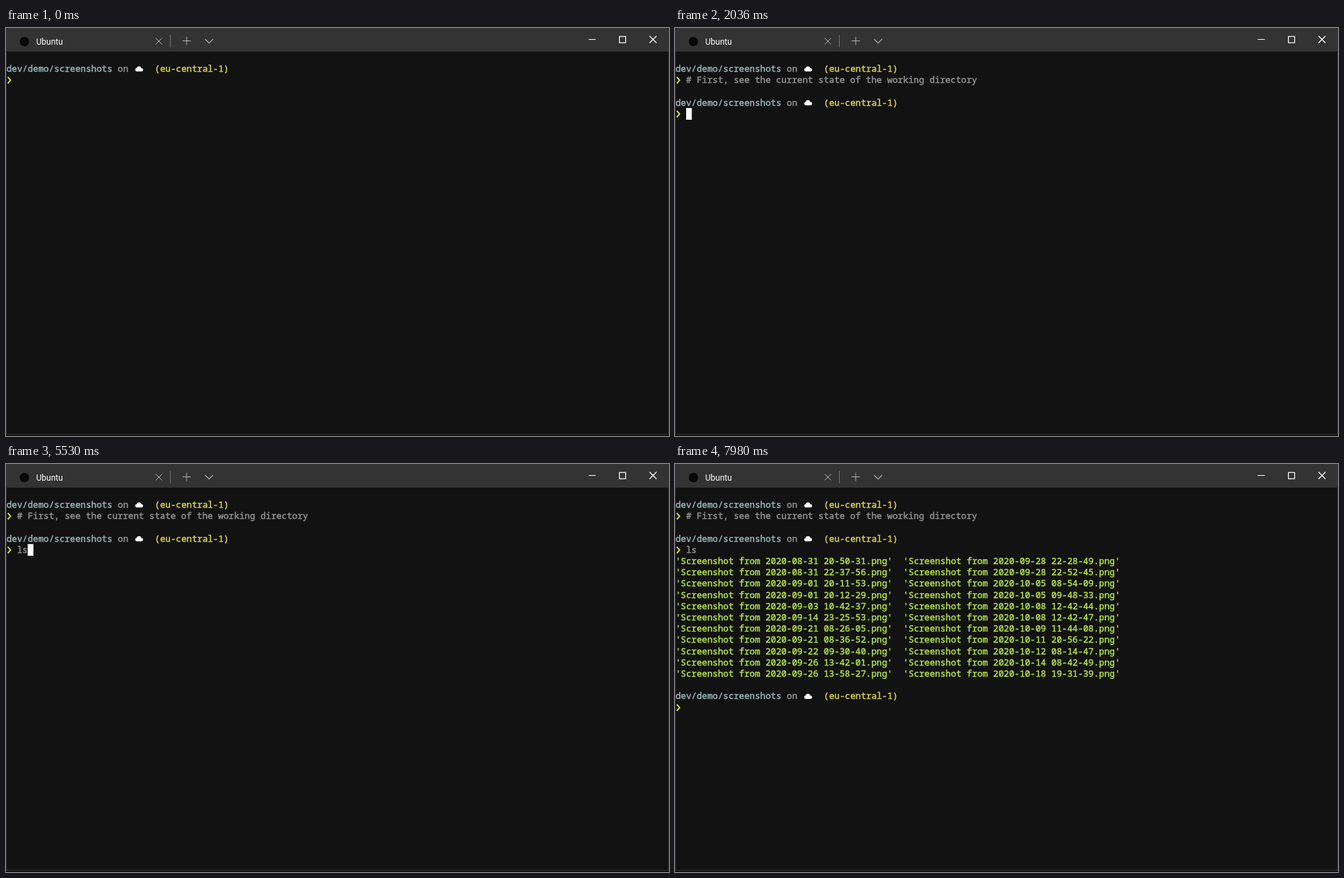
An HTML page with a canvas that plays this animation: 954 px wide and 587 px high, repeating every 8000 ms.

```html
<!DOCTYPE html>
<html lang="en">
<head>
<meta charset="utf-8">
<title>Terminal</title>
<style>
  html, body { margin: 0; width: 100%; height: 100%; overflow: hidden; background: #121212; }
  canvas { display: block; }
</style>
</head>
<body>
<canvas id="stage" width="954" height="587"></canvas>
<script>
const ctx = document.getElementById('stage').getContext('2d');
const LOOP = 8000;
const CELL = { x: 0.76, y: 50.4, w: 7.62, h: 16.2 };
const COLORS = {
  path: '#98b5b7', dim: '#929292', region: '#d9cf4e',
  arrow: '#d8e64a', file: '#b4e347', cursor: '#ffffff'
};

const LEFT_FILES = [
  '08-31 20-50-31', '08-31 22-37-56', '09-01 20-11-53', '09-01 20-12-29',
  '09-03 10-42-37', '09-14 23-25-53', '09-21 08-26-05', '09-21 08-36-52',
  '09-22 09-30-40', '09-26 13-42-01', '09-26 13-58-27'
];
const RIGHT_FILES = [
  '09-28 22-28-49', '09-28 22-52-45', '10-05 08-54-09', '10-05 09-48-33',
  '10-08 12-42-44', '10-08 12-42-47', '10-09 11-44-08', '10-11 20-56-22',
  '10-12 08-14-47', '10-14 08-42-49', '10-18 19-31-39'
];

const colX = col => CELL.x + col * CELL.w;
const rowY = row => CELL.y + row * CELL.h;

function fillRect(color, x, y, w, h) {
  ctx.fillStyle = color;
  ctx.fillRect(x, y, w, h);
}

function stroke(color, width, ...lines) {
  ctx.strokeStyle = color;
  ctx.lineWidth = width;
  ctx.beginPath();
  for (const [x, y, ...rest] of lines) {
    ctx.moveTo(x, y);
    for (let i = 0; i < rest.length; i += 2) ctx.lineTo(rest[i], rest[i + 1]);
  }
  ctx.stroke();
}

// A thin outline gives a weight between regular and bold.
function print(text, col, row, color) {
  const x = colX(col), y = rowY(row) + 12.6;
  ctx.font = '12.7px "Noto Sans Mono", "DejaVu Sans Mono", monospace';
  ctx.fillStyle = ctx.strokeStyle = color;
  ctx.lineWidth = 0.45;
  ctx.lineJoin = 'round';
  ctx.fillText(text, x, y);
  ctx.strokeText(text, x, y);
  ctx.lineJoin = 'miter';
}

function drawCloud(row) {
  const y = rowY(row) + 12.2;
  ctx.fillStyle = '#ffffff';
  ctx.beginPath();
  ctx.arc(188.5, y - 2.5, 2.5, 0, 7);
  ctx.arc(191.3, y - 4.1, 3.3, 0, 7);
  ctx.arc(194.9, y - 2.4, 2.4, 0, 7);
  ctx.rect(188.5, y - 3, 6.4, 3);
  ctx.fill();
}

function drawPrompt(row) {
  print('dev/demo/screenshots', 0, row, COLORS.path);
  print('on', 21, row, COLORS.dim);
  drawCloud(row);
  print('(eu-central-1)', 28, row, COLORS.region);
  const y = rowY(row + 1) + 8.5;
  stroke(COLORS.arrow, 1.9, [2.6, y - 4.6, 6.6, y, 2.6, y + 4.6]);
}

function drawCursor(col, row) {
  fillRect(COLORS.cursor, colX(col), rowY(row), 8.2, 16.8);
}

function drawFiles() {
  const name = stamp => `'Screenshot from 2020-${stamp}.png'`;
  LEFT_FILES.forEach((stamp, i) => {
    print(name(stamp), 0, 5 + i, COLORS.file);
    print(name(RIGHT_FILES[i]), 43, 5 + i, COLORS.file);
  });
}

function drawWindow() {
  fillRect('#121212', 0, 0, 954, 587);
  fillRect('#333333', 0, 0, 954, 34);
  fillRect('#303030', 0, 34, 1, 551);
  fillRect('#303030', 953, 34, 1, 551);
  fillRect('#303030', 0, 584, 954, 1);

  ctx.fillStyle = '#080808';
  ctx.beginPath();
  ctx.arc(26.5, 19.5, 6.8, 0, 7);
  ctx.fill();

  ctx.font = '12px Roboto, "Open Sans", sans-serif';
  ctx.fillStyle = '#ffffff';
  ctx.fillText('Ubuntu', 43.5, 24);

  stroke('#b0b0b0', 1, [215.5, 14.5, 224.5, 23.5], [224.5, 14.5, 215.5, 23.5]);
  stroke('#707070', 1, [236.5, 10, 236.5, 28]);
  stroke('#b0b0b0', 1, [254, 18.5, 266, 18.5], [260, 12.5, 260, 24.5]);
  stroke('#b0b0b0', 1.1, [286.5, 16, 292.2, 21.7, 298, 16]);

  stroke('#ffffff', 1.2, [838.5, 16.5, 848.5, 16.5],
    [926, 11.5, 936, 21.5], [936, 11.5, 926, 21.5]);
  ctx.strokeRect(882.6, 12.2, 9, 9);
}

function draw(time) {
  drawWindow();
  drawPrompt(0);
  if (time >= 500 && time < 980) drawCursor(2, 1);
  if (time >= 980) {
    print('# First, see the current state of the working directory', 2, 1, COLORS.dim);
    drawPrompt(3);
    if (time < 2740) drawCursor(2, 4);
  }
  if (time >= 4480) {
    print('ls', 2, 4, COLORS.dim);
    if (time < 6230) drawCursor(4, 4);
  }
  if (time >= 6230) {
    drawFiles();
    drawPrompt(17);
    if (time < 7980) drawCursor(2, 18);
  }
}

const start = performance.now();
function tick() {
  draw((performance.now() - start) % LOOP);
  requestAnimationFrame(tick);
}
tick();
</script>
</body>
</html>
```
